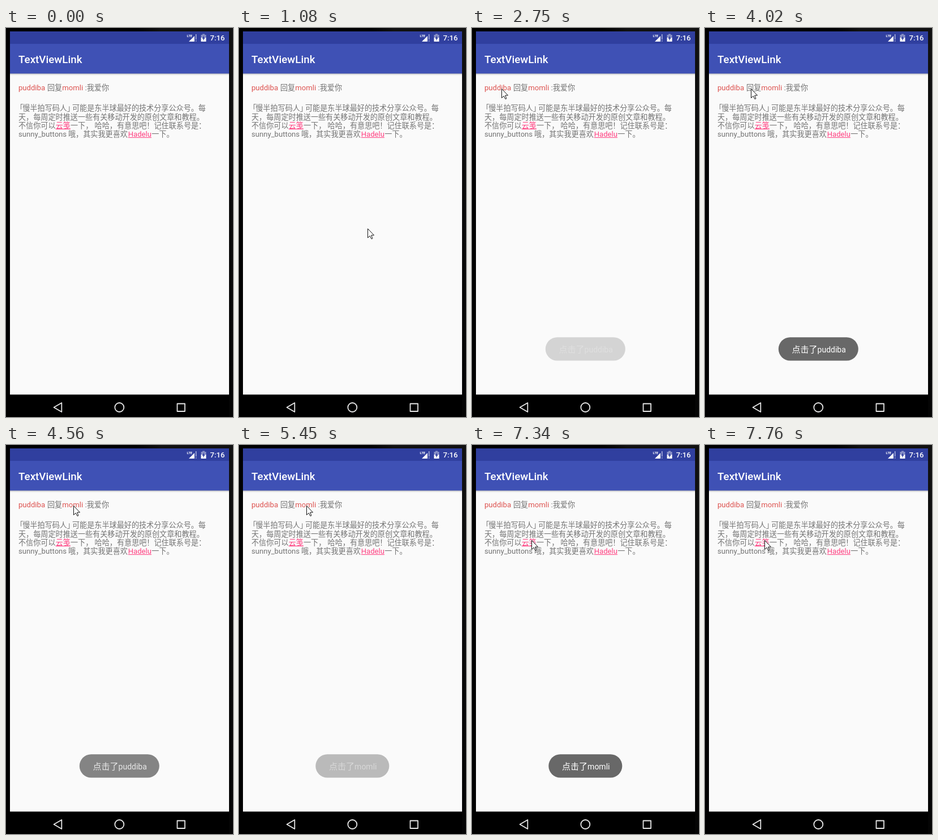
Write an HTML page with a canvas that moves like this. It is 401 px wide and 687 px high and loops after 8000 ms.

```html
<!DOCTYPE html>
<html lang="zh-CN">
<head>
<meta charset="utf-8">
<title>TextViewLink</title>
<style>
  html, body { margin: 0; width: 100%; height: 100%; overflow: hidden; background: #000; }
  canvas { display: block; width: 401px; height: 687px; }
</style>
</head>
<body>
<canvas id="stage"></canvas>
<script>
const W = 401, H = 687, LOOP = 8000;
const STEP = 130; // the screen refreshes in coarse steps while something moves
const FONT = 'Roboto, "Noto Sans CJK SC", "Noto Sans CJK", sans-serif';
const GRAY = '#737373', RED = '#dd5350', PINK = '#ff4081';

const canvas = document.getElementById('stage');
const ctx = canvas.getContext('2d');
const dpr = window.devicePixelRatio || 1;
canvas.width = W * dpr;
canvas.height = H * dpr;

// The pointer enters from below right and visits these points
const entry = { x: 444, y: 713 };
const moves = [
  { at: 560, steps: 2, x: 300, y: 541 },
  { at: 945, steps: 2, x: 227, y: 354, power: 1 },
  { at: 1230, steps: 4, x: 52, y: 112 },
  { at: 1770, steps: 3, x: 52, y: 107 },
  { at: 4020, steps: 4, x: 119, y: 107 },
  { at: 6400, steps: 2, x: 117, y: 172 },
  { at: 6670, steps: 1, x: 115, y: 177 },
  { at: 6920, steps: 4, x: 105, y: 168 }
];

const toasts = [
  { name: 'puddiba', width: 141, show: 2750, steps: 3, power: .76, hide: 4560 },
  { name: 'momli', width: 130, show: 5450, steps: 4, power: 2, hide: 7490 }
];

// Stepped progress from 0 to 1; the first step is already visible at the start time
function progress(t, start, steps) {
  const done = Math.floor((t - start) / STEP) + 1;
  return Math.min(Math.max(done / steps, 0), 1);
}

const easeOut = (p, power = 2) => 1 - (1 - p) ** power;

function pointerAt(t) {
  let { x, y } = entry;
  for (const m of moves) {
    const p = easeOut(progress(t, m.at, m.steps), m.power);
    x += (m.x - x) * p;
    y += (m.y - y) * p;
  }
  return { x, y };
}

function toastAlpha({ show, steps, power, hide }, t) {
  return easeOut(progress(t, show, steps), power) * (1 - progress(t, hide, 3) ** 1.5);
}

function rect(x, y, w, h, color) {
  ctx.fillStyle = color;
  ctx.fillRect(x, y, w, h);
}

function gradient(x0, y0, x1, y1, ...colors) {
  const g = ctx.createLinearGradient(x0, y0, x1, y1);
  colors.forEach((c, i) => g.addColorStop(i / (colors.length - 1), c));
  return g;
}

function shape(points, fill, stroke, width = 1) {
  ctx.beginPath();
  points.forEach(([x, y]) => ctx.lineTo(x, y));
  ctx.closePath();
  if (fill) { ctx.fillStyle = fill; ctx.fill(); }
  if (stroke) {
    ctx.strokeStyle = stroke;
    ctx.lineWidth = width;
    ctx.lineJoin = 'round';
    ctx.stroke();
  }
}

function label(text, x, y, color = GRAY, size = 13.125, weight = 400) {
  ctx.font = `${weight} ${size}px ${FONT}`;
  ctx.fillStyle = color;
  ctx.fillText(text, x, y);
  return ctx.measureText(text).width;
}

function link(text, x, y) {
  const w = label(text, x, y, PINK);
  rect(x, y + 1, w, 1, PINK);
}

function drawFrame() {
  rect(0, 0, W, H, '#000');
  rect(230, 0, W - 230, 6, gradient(230, 0, 275, 0, '#000', '#111'));
  rect(394, 0, 7, H, gradient(0, 0, 0, H, '#111', '#040404'));
}

function drawStatus() {
  const dim = '#8991c7', bar = '#303f9f';
  rect(7, 6, 387, 22, bar);
  label('LTE', 319.5, 15.5, '#fff', 6, 700);
  shape([[323, 24], [333, 24], [333, 14]], '#fff');
  rect(335, 11, 1.3, 9.5, '#c3c8e6');
  rect(335, 22, 1.3, 1.7, '#c3c8e6');
  rect(347, 10.5, 4, 2, dim);
  rect(344.5, 12, 9, 5, dim);
  rect(344.5, 17, 9, 7, '#fff');
  shape([[350, 13], [346.3, 18.7], [348.6, 18.7], [348, 22.8], [351.7, 17], [349.5, 17]], bar);
  label('7:16', 360.5, 22, '#fff', 13.125, 500);
}

function drawPage() {
  rect(7, 28, 387, 619.4, '#fafafa');
  rect(7, 28, 387, 52.5, '#3f51b5');
  rect(7, 80.5, 387, 4, gradient(0, 80.5, 0, 84.5, 'rgba(0,0,0,.26)', 'rgba(0,0,0,.06)', 'rgba(0,0,0,0)'));
  label('TextViewLink', 22, 62, '#fff', 18.75, 500);

  label('puddiba', 22, 110, RED);
  label('回复', 73, 110);
  label('momli', 99.3, 110, RED);
  label(':我爱你', 139.5, 110);

  const line = i => Math.round(146.2 + 15.4 * i);
  label('｢', 24, line(0));
  label('慢半拍写码人｣', 29.2, line(0));
  label('可能是东半球最好的技术分享公众号。每', 117, line(0));
  label('天，每周定时推送一些有关移动开发的原创文章和教程。', 22, line(1));
  label('不信你可以', 22, line(2));
  link('云笺', 87.7, line(2));
  label('一下， 哈哈，有意思吧！记住联系号是：', 114, line(2));
  label('sunny_buttons', 22, line(3));
  label('哦，其实我更喜欢', 110, line(3));
  link('Hadelu', 215.7, line(3));
  label('一下。', 257.2, line(3));
}

function drawNav() {
  const ink = '#e6e6e6';
  shape([[84.5, 670], [98.3, 662], [98.3, 678]], null, ink, 1.8);
  ctx.beginPath();
  ctx.arc(200.3, 670, 8, 0, Math.PI * 2);
  ctx.stroke();
  shape([[302.5, 663.5], [316, 663.5], [316, 677], [302.5, 677]], null, ink, 1.8);
}

function drawToast(toast, t) {
  const x = 200.3 - toast.width / 2;
  ctx.globalAlpha = toastAlpha(toast, t);
  ctx.fillStyle = '#686868';
  ctx.beginPath();
  ctx.roundRect(x, 546.2, toast.width, 41.3, 20.6);
  ctx.fill();
  const w = label('点击了', x + 23.8, 573, '#fff', 15);
  label(toast.name, x + 23.8 + w, 573, '#fff', 14);
  ctx.globalAlpha = 1;
}

function drawPointer(t) {
  if (t < moves[0].at) return;
  const { x, y } = pointerAt(t);
  ctx.save();
  ctx.translate(Math.round(x) + .5, Math.round(y) + .5);
  shape([[0, 0], [0, 16], [3.7, 12.6], [6.5, 18], [8.4, 17.2], [6.2, 11.5], [11, 11.5]], '#fff', '#111');
  ctx.restore();
}

function draw(t) {
  ctx.setTransform(dpr, 0, 0, dpr, 0, 0);
  drawFrame();
  drawPage();
  drawStatus();
  drawNav();
  toasts.forEach(toast => drawToast(toast, t));
  drawPointer(t);
}

const start = performance.now();
function tick() {
  draw((performance.now() - start) % LOOP);
  requestAnimationFrame(tick);
}
tick();
</script>
</body>
</html>
```
